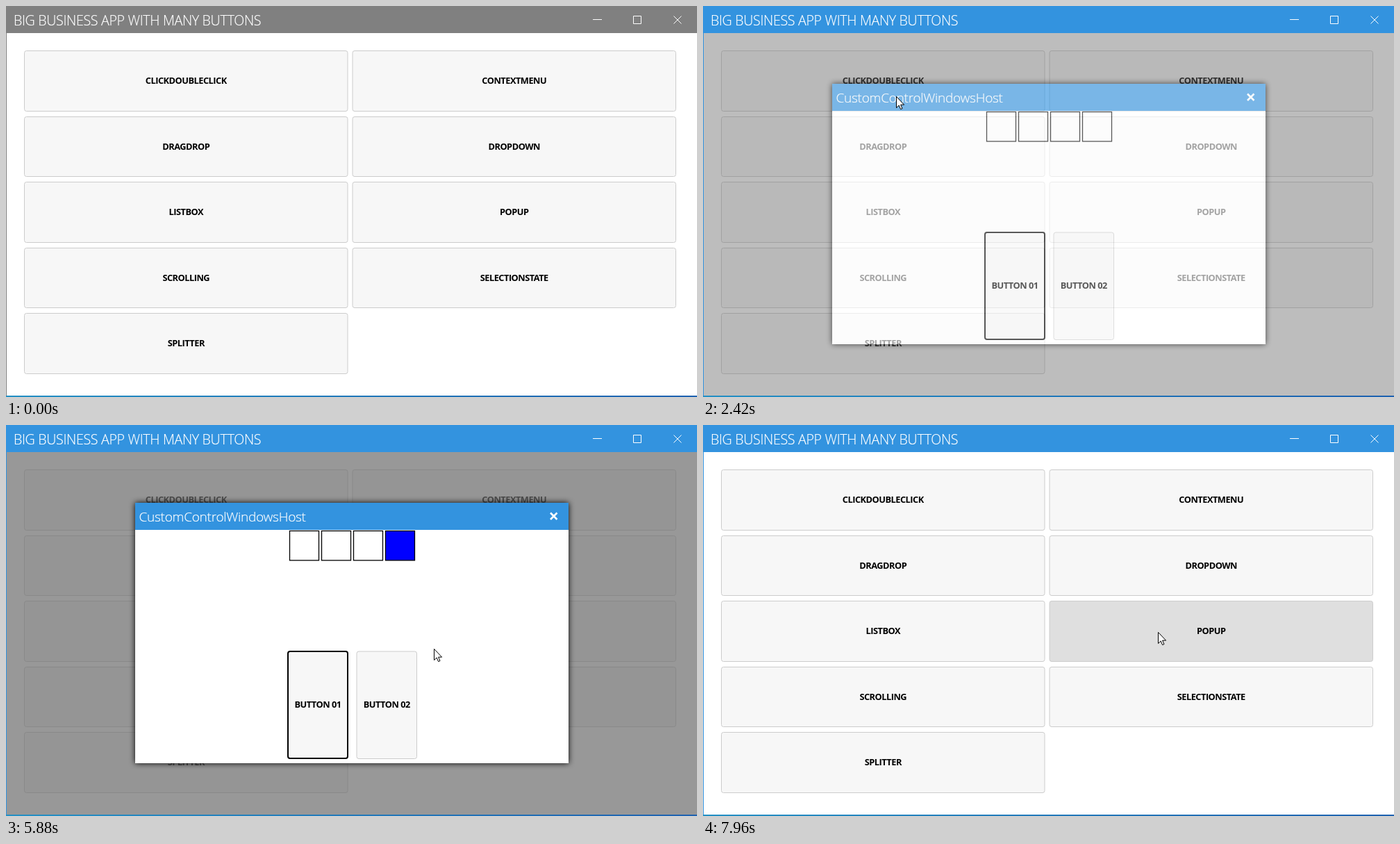
These frames come from a looping animation (995x563 px, 8000 ms). An HTML page:

```html
<!DOCTYPE html>
<html lang="en">
<head>
<meta charset="utf-8">
<title>Button clicks</title>
<style>
  html, body { margin: 0; width: 100%; height: 100%; overflow: hidden; background: #fff; }
  svg { display: block; width: 995px; height: 563px; }
  text { font-family: "Open Sans", "Noto Sans", sans-serif; }
  .title { font-weight: 300; font-size: 19.6px; letter-spacing: -.3px; fill: #fff; stroke: #fff; stroke-width: .2; }
  .label { font-weight: 700; font-size: 12.8px; letter-spacing: -.5px; text-anchor: middle; }
  .button { fill: #f7f7f7; stroke: #ccc; }
  .focused { stroke: #000; stroke-width: 2; }
  .square { fill: #fff; stroke: #000; stroke-width: 1.3; }
  .icon { fill: none; stroke: #fff; }
</style>
</head>
<body>
<svg viewBox="0 0 995 563">
  <defs>
    <linearGradient id="edge"><stop stop-color="#2490c4"/><stop offset="1" stop-color="#1f62b0"/></linearGradient>
  </defs>
  <rect width="995" height="563" fill="#fff"/>
  <g id="main"></g>
  <path id="overlay" fill="#6d6d6d" fill-rule="evenodd" d="M0 39H995V563H0ZM186 112V487H810V112Z"/>
  <g id="frame">
    <rect width="995" height="39"/>
    <rect width="1" height="563"/>
  </g>
  <rect y="561" width="995" height="2" fill="url(#edge)"/>
  <text class="title" x="11" y="28">BIG BUSINESS APP WITH MANY BUTTONS</text>
  <path class="icon" d="M845 19.5H858M903.5 14.5H914.5V25.5H903.5ZM961.5 14.5L972.5 25.5M972.5 14.5L961.5 25.5"/>
  <g id="popup">
    <rect x="186" y="112" width="624" height="375" fill="#fff" style="filter:drop-shadow(0 0 4px #000)"/>
    <rect x="186" y="112" width="624" height="39" fill="#3393df"/>
    <rect id="close" x="768" y="112" width="42" height="39" fill="#789dd5"/>
    <text class="title" style="font-size:19.1px" x="191.5" y="139">CustomControlWindowsHost</text>
    <path class="icon" stroke-width="2.6" d="M784 126.5L793.5 136M793.5 126.5L784 136"/>
    <g id="content"></g>
  </g>
  <path id="cursor" fill="#fff" stroke="#000" d="M.5 .5V16.6L4.2 13.1L6.6 18.6L9 17.6L6.6 12.2H11.6Z"/>
</svg>
<script>
const LOOP = 8000;
const ENTER = 850, OPEN = 2140, CLOSE = 6760, FADE = 440;
const byId = id => document.getElementById(id);
const [main, overlay, frame, popup, closeBox, content, cursor] =
  ['main', 'overlay', 'frame', 'popup', 'close', 'content', 'cursor'].map(byId);

function add(parent, tag, attrs, text = '') {
  const node = document.createElementNS('http://www.w3.org/2000/svg', tag);
  for (const key in attrs) node.setAttribute(key, attrs[key]);
  node.textContent = text;
  return parent.appendChild(node);
}

function addButton(parent, label, x, y, width, height) {
  const rect = add(parent, 'rect', { class: 'button', x, y, width, height, rx: 3 });
  add(parent, 'text', { class: 'label', x: x + width / 2, y: Math.round(y + height / 2 + 4) }, label);
  return { rect, x, y, width, height };
}

const names = ['CLICKDOUBLECLICK', 'CONTEXTMENU', 'DRAGDROP', 'DROPDOWN', 'LISTBOX',
  'POPUP', 'SCROLLING', 'SELECTIONSTATE', 'SPLITTER'];
const mainButtons = names.map((name, i) => {
  const offset = 94.45 * (i >> 1);
  const top = Math.round(64.4 + offset), bottom = Math.round(151 + offset);
  return addButton(main, name, 26.5 + i % 2 * 472.5, top + .5, 465.5, bottom - top);
});

// A single and a double click on each button light one square each.
const squares = [{ on: 3530, off: 4200 }, { on: 4200, off: 4470 }, { on: 4870, off: 5740 }, { on: 5200, off: LOOP }]
  .map((time, i) => ({
    ...time,
    rect: add(content, 'rect', { class: 'square', x: 408.5 + 46 * i, y: 152.5, width: 42, height: 42.4 })
  }));
const first = addButton(content, 'BUTTON 01', 406, 326, 86, 154);
const second = addButton(content, 'BUTTON 02', 505, 326, 86.5, 154.5);
first.rect.classList.add('focused');

const linear = k => k;
const smooth = k => k * k * (3 - 2 * k);
const out = power => k => 1 - (1 - k) ** power;
const ramp = (t, start, length) => Math.min(1, Math.max(0, (t - start) / length));

// Pointer trips, each bent by easing its two axes differently
const entry = { x: 864, y: 553 };
const trips = [
  { x: 278, y: 130, start: ENTER, length: 650, easeX: out(2.2), easeY: smooth },
  { x: 462, y: 385, start: 2600, length: 900, easeX: out(3), easeY: smooth },
  { x: 506, y: 388, start: 4560, length: 110, easeX: linear, easeY: linear },
  { x: 789, y: 136, start: 5670, length: 800, easeX: out(1.6), easeY: linear },
  { x: 655, y: 298, start: 7290, length: 620, easeX: smooth, easeY: out(2) }
];

function pointerAt(t) {
  let { x, y } = entry;
  for (const trip of trips) {
    const k = ramp(t, trip.start, trip.length);
    x += (trip.x - x) * trip.easeX(k);
    y += (trip.y - y) * trip.easeY(k);
  }
  return { x: Math.round(x), y: Math.round(y) };
}

function draw(t) {
  const pointer = pointerAt(t);
  const shown = ramp(t, OPEN, FADE) - ramp(t, CLOSE, FADE);
  const open = t >= OPEN && t < CLOSE + FADE;
  const over = b => t >= ENTER && pointer.x >= b.x && pointer.x <= b.x + b.width &&
    pointer.y >= b.y && pointer.y <= b.y + b.height;
  const paint = (b, active, hover = '#dfdfdf') => b.rect.style.fill = active && over(b) ? hover : '#f7f7f7';

  frame.setAttribute('fill', t < OPEN ? '#808080' : '#3393df');
  overlay.style.opacity = shown * .7;
  popup.style.opacity = shown;
  mainButtons.forEach(b => paint(b, !open));

  const press = Math.max(0, 1 - Math.abs(t - 3920) / 120);
  const shade = Math.round(223 - 27 * press);
  paint(first, open, `rgb(${shade},${shade},${shade})`);
  paint(second, open);
  closeBox.style.opacity = over({ x: 768, y: 112, width: 42, height: 39 }) ? 1 : 0;
  for (const { rect, on, off } of squares) rect.style.fill = t >= on && t < off ? '#00f' : '#fff';

  cursor.style.display = t < ENTER ? 'none' : '';
  cursor.setAttribute('transform', `translate(${pointer.x} ${pointer.y})`);
}

const start = performance.now();
function tick() {
  draw((performance.now() - start) % LOOP);
  requestAnimationFrame(tick);
}
tick();
</script>
</body>
</html>
```
